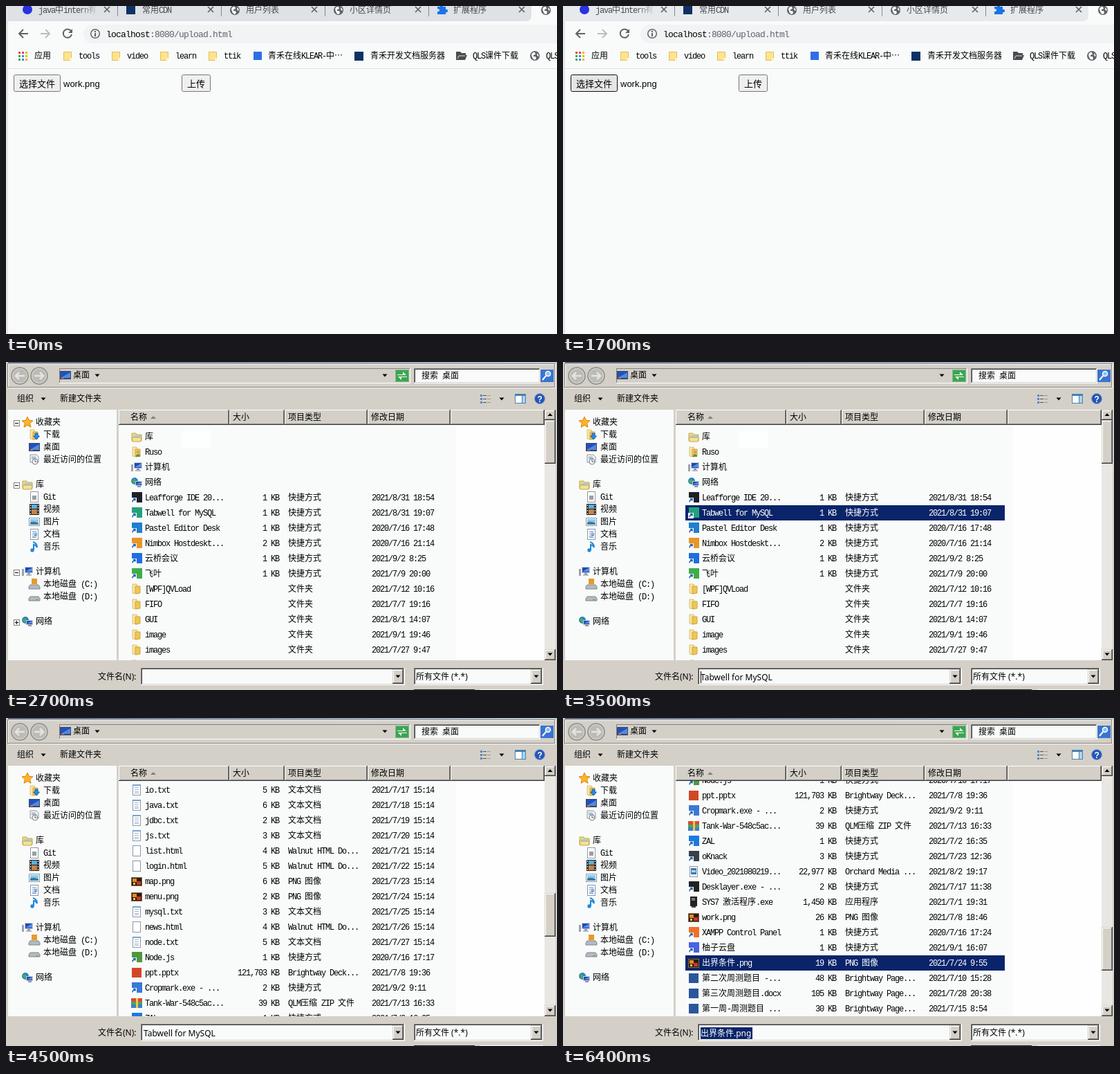
Recreate the animation shown at these times as an HTML page. Size 797 by 474 pixels, loop 8000 ms.

```html
<!DOCTYPE html>
<html lang="zh">
<head>
<meta charset="utf-8">
<title>Upload</title>
<style>
html,body{margin:0;width:100%;height:100%;overflow:hidden;background:#f9fbfa}
svg{display:block;width:797px;height:474px}
text{font:12px "Noto Sans CJK SC","Noto Sans CJK",sans-serif;white-space:pre;fill:#000}
.l{font:12px "Liberation Mono",monospace;letter-spacing:-1.2px}
.url{font:13px "Liberation Mono",monospace;letter-spacing:-.8px}
.ui{font-family:"Noto Sans","Noto Sans CJK SC",sans-serif}
.btn{font:13px "Liberation Sans","Noto Sans CJK SC",sans-serif}
.tab{fill:#45494d}
.link{fill:#00009c;text-decoration:underline}
.on text,.white{fill:#fff}
rect{shape-rendering:crispEdges}
rect[rx]{shape-rendering:auto}
</style>
</head>
<body>
<svg id="stage" viewBox="0 0 797 474"></svg>
<script>
const FACE = '#d4d0c8', PAPER = '#f9fbfa', NAVY = '#0a246a', GREY = '#5f6368';

// drawing helpers
const r = (x, y, w, h, fill, more = '') => `<rect x="${x}" y="${y}" width="${w}" height="${h}" fill="${fill}" ${more}/>`;
const p = (d, fill, line = 'none', width = 1) => `<path d="${d}" fill="${fill}" stroke="${line}" stroke-width="${width}"/>`;
const c = (x, y, rad, fill, line = 'none', width = 1) => `<circle cx="${x}" cy="${y}" r="${rad}" fill="${fill}" stroke="${line}" stroke-width="${width}"/>`;
const g = (body, attrs = '') => `<g ${attrs}>${body}</g>`;
const at = (x, y, body) => g(body, `transform="translate(${x} ${y})"`);
const plain = (x, y, s, cls = '', more = '') => `<text x="${x}" y="${y}" class="${cls}" ${more}>${s}</text>`;
const text = (x, y, s, cls, more) => plain(x, y, s.replace(/[\x20-\x7e]+/g, m => `<tspan class="l">${m}</tspan>`), cls, more);
const down = (x, y) => p(`M${x - 3.5} ${y - 1.5}h7l-3.5 4z`, '#000');
const up = (x, y) => p(`M${x - 3.5} ${y + 2}h7l-3.5 -4z`, '#000');
const raised = (x, y, w, h) => r(x, y, w, h, '#404040') + r(x, y, w - 1, h - 1, '#fff') +
  r(x + 1, y + 1, w - 2, h - 2, '#808080') + r(x + 1, y + 1, w - 3, h - 3, FACE);
const knob = (x, y, w, h) => r(x, y, w, h, '#404040') + r(x, y, w - 1, h - 1, FACE) +
  r(x + 1, y + 1, w - 2, h - 2, '#808080') + r(x + 1, y + 1, w - 3, h - 3, '#fff') + r(x + 2, y + 2, w - 4, h - 4, FACE);
const sunk = (x, y, w, h, fill) => r(x, y, w, h, '#fff') + r(x, y, w - 1, h - 1, '#808080') +
  r(x + 1, y + 1, w - 2, h - 2, FACE) + r(x + 1, y + 1, w - 3, h - 3, '#404040') + r(x + 2, y + 2, w - 4, h - 4, fill);
const etched = (x, y, w, h) => r(x + 1.5, y + 1.5, w, h, 'none', 'stroke="#fff"') + r(x + .5, y + .5, w, h, 'none', 'stroke="#808080"');

// 16 x 16 icons
const sheet = r(2, 0, 12, 16, '#8b98a8') + r(3, 1, 10, 14, '#fff');
const lines = fill => [4, 7, 10, 12].map(y => r(5, y, 6, 1, fill)).join('');
const arrow = r(0, 8, 8, 8, '#fff') + p('M2 14.500q0-3.500 3.500-3.500M3 9.500h3v3', 'none', '#1457a8', 1.4);
const folder = p('M2 1h6l1 2v12l-7-1z', '#f8e6a8', '#dcc070') + p('M6 4h7v10l-7 1z', '#eec653', '#d2a53a');
const screen = (x, y, w, h) => r(x, y, w, h, '#c9ccd4') + r(x + 1, y + 1, w - 2, h - 2, '#1e48b4') +
  p(`M${x + 1} ${y + h - 2}l${w - 2}-${h - 3}v${h - 3}z`, '#5a8ee6');
const icons = {
  folder,
  lib: p('M1 3h6l1 2h7v9H1z', '#f3d878', '#caa544') + r(3, 6, 11, 5, '#9bd0ee') + p('M1 9h14l-1 6H2z', '#f5e19a', '#caa544'),
  user: folder + c(10, 8, 2, '#d59b62') + p('M7 15v-2q3-4 6 0v2z', '#4d9c5a'),
  pc: r(0, 4, 3, 10, '#9aa3ad') + screen(4, 1, 12, 9) + r(8, 10, 4, 2, '#8a939c') + r(6, 12, 8, 2, '#b4bbc4'),
  net: c(5, 6, 5, '#2b7fd0') + p('M1 5q4-4 5 0t-3 5z', '#49ad4c') + screen(6, 6, 10, 7) + r(9, 13, 5, 2, '#8a939c'),
  star: p('M8 0l2.3 5.2 5.7.6-4.3 3.8 1.3 5.7L8 12.4l-5 2.9 1.3-5.7L0 5.8l5.7-.6z', '#fbb428', '#e08212'),
  load: folder + p('M9 6h4v4h2.5L11 15 6.500 10H9z', '#2a8ae2', '#1464b4'),
  desk: r(0, 2, 16, 12, '#3c4660') + r(1, 3, 14, 9, '#2450b8') + p('M1 12L15 4v8z', '#4f8ae0') + r(2, 12, 4, 1, '#e2703a'),
  recent: p('M2 1h9l3 3v8H2z', '#eef2f6', '#8b98a8') + r(4, 4, 6, 1, '#7d8ea2') + r(4, 6, 7, 1, '#7d8ea2') +
    c(9, 11, 4, '#f4f6f8', '#7a858f') + p('M9 8.500V11h2.500', 'none', '#555'),
  git: sheet + r(5, 6, 6, 6, '#9a9ea4'),
  film: r(1, 0, 14, 16, '#222') + r(4, 1, 8, 6, '#5caee0') + r(4, 8, 8, 7, '#c78345') +
    [1, 5, 9, 13].map(y => r(2, y, 1, 2, '#fff') + r(13, y, 1, 2, '#fff')).join(''),
  pic: r(0, 2, 16, 12, '#8b98a8') + r(1, 3, 14, 10, '#fff') + r(2, 4, 12, 8, '#8cc8f0') + p('M2 12V9q5-3 12 1v2z', '#3b7d9e'),
  text: sheet + lines('#5c87c2') + r(8, 6, 4, 4, '#77b0e0'),
  note: p('M6 1q6 2 6 8-1-3-5-4v8', 'none', '#2188dc', 2) + c(5, 13, 2.7, '#2188dc'),
  disk: p('M2 8h12l2 3v3H0v-3z', '#b5bac0', '#7e858c') + r(10, 12, 4, 1, '#56b05c'),
  sys: p('M2 9h12l2 3v3H0v-3z', '#b5bac0', '#7e858c') + r(4, 0, 8, 8, '#e89a2c'),
  pdf: sheet + r(2.5, .5, 11, 15, 'none', 'stroke="#d8202c"') + r(0, 7, 13, 7, '#e02030') +
    plain(1, 13, 'PDF', 'white', 'style="font:bold 6px Liberation Sans,sans-serif"'),
  txt: sheet + lines('#9ab2cc') + r(3, 0, 10, 2, '#7aa4cf'),
  doc: r(1, 1, 14, 14, '#2b579a'),
  ppt: r(1, 1, 14, 14, '#d24726'),
  html: sheet,
  zip: r(0, 1, 16, 5, '#d94b3b') + r(0, 6, 16, 4, '#4aa84e') + r(0, 10, 16, 5, '#3c7fd0') + r(7, 1, 3, 14, '#f2c84c'),
  wmv: sheet + r(4, 3, 8, 9, '#3d78b4') + r(5, 6, 6, 3, '#b4d4ea'),
  exe: r(3, 0, 10, 14, '#222') + r(5, 2, 5, 4, '#777') + r(5, 14, 6, 2, '#444'),
  png: r(0, 2, 16, 13, '#8b6a4a') + r(1, 3, 14, 11, '#2c1a14') + r(2, 4, 6, 5, '#e48a24') + r(8, 8, 6, 5, '#c83c20') + r(3, 10, 3, 3, '#f4d048')
};
const icon = (key, x, y) => at(x, y, key[0] === '#' ? r(1, 0, 15, 15, key) + arrow : icons[key]);

// browser page
const globe = (x, y) => at(x, y, c(0, 0, 7, GREY) + p('M-5 -2q2-4 5-3l1 3-3 1 0 2h3l1 3-2 2q-4-1-5-8zM3 -4q3 2 2.500 5l-2-1z', '#fff'));
const close = x => p(`M${x - 4} 1l8 8m0-8l-8 8`, 'none', GREY, 1.7);
const bookFolder = x => r(x, 66, 12, 13, '#e3c057') + r(x + 1, 67, 10, 11, '#fee390') + r(x + 9, 75, 3, 4, '#fff3c4');
const titles = ['java中intern有', '常用CDN', '用户列表', '小区详情页', '扩展程序'];
const page = r(0, 0, 797, 474, PAPER) + r(0, 0, 3, 474, '#e6e7ec') +
  r(2, 0, 795, 22, '#dee1e6', 'id="strip"') + p('M752 22q8 0 8-8V0h37v22z', PAPER) +
  titles.map((s, i) => text(47 + 150 * i, 10, s, i ? 'tab' : '', i ? '' : 'style="fill:url(#fade)"') +
    close(146 + 150 * i) + (i < 4 ? r(161 + 150 * i, 0, 1, 15, '#858a90') : '')).join('') +
  c(31, 5, 7, '#2932e1') + r(174, -1, 13, 13, '#0d3263') + globe(331, 6) + globe(481, 6) +
  p('M624 1h4q-1-4 2-4t2 4h4v4q3-1 3 2t-3 2v3h-12V8q3 0 3-2t-3-2z', '#1a73e8') + globe(781, 6) +
  p('M32 40H19m6-6l-6 6 6 6', 'none', GREY, 2) + p('M50 40h13m-6-6l6 6-6 6', 'none', '#babcbe', 2) +
  p('M94 36a6.200 6.200 0 1 0 1 5', 'none', GREY, 2) + p('M96 33v6h-6z', GREY) +
  r(112, 27, 720, 27, '#f1f3f4', 'rx="13.5"') + c(129, 40, 6.300, 'none', GREY, 1.500) + r(128, 39, 2, 5, GREY) + r(128, 36, 2, 2, GREY) +
  plain(145, 45, `localhost<tspan fill="${GREY}">:8080/upload.html</tspan>`, 'url') +
  ['#e8453c', '#e8453c', '#f4b400', '#34a853', '#4285f4', '#f4b400', '#34a853', '#4285f4', '#f4b400']
    .map((f, i) => r(18 + i % 3 * 5, 66 + (i / 3 | 0) * 5, 3, 3, f)).join('') +
  text(41, 76, '应用') + ['tools', 'video', 'learn', 'ttik'].map((s, i) => bookFolder(83 + 70 * i) + text(105 + 70 * i, 76, s)).join('') +
  r(358, 66, 12, 12, '#2f6fe4') + text(379, 76, '青禾在线KLEAR-中…') + r(504, 66, 13, 13, '#0d3263') + text(527, 76, '青禾开发文档服务器') +
  p('M651 66h6l2 2h6v3h2l-3 7h-13z', '#4a4d50') + p('M653 76l2-4h9', 'none', '#ddd') + text(675, 76, 'QLS课件下载') +
  globe(765, 72) + text(781, 76, 'QLS课件') + r(3, 90, 794, 1, '#dfe1e5') +
  r(11.5, 99.5, 67, 24, '#efefef', 'id="pick" rx="2" stroke="#767676"') + plain(19, 117, '选择文件', 'btn') + plain(83, 117, 'work.png', 'btn') +
  r(254.5, 99.5, 41, 24, '#efefef', 'rx="2" stroke="#767676"') + plain(262, 117, '上传', 'btn');

// file dialog
const help = (x, y) => c(x, y, 7.500, '#2456b8', '#8fa3c8') + plain(x - 3.5, y + 4.5, '?', 'white', 'style="font:bold 12px Liberation Sans,sans-serif"');
const pane = (x, y) => r(x, y, 16, 14, '#4a80b0') + r(x + 1, y + 3, 9, 10, '#fff') + r(x + 11, y + 3, 4, 10, '#a8d4f0');
const combo = (x, w) => sunk(x, 442, w, 25, PAPER) + knob(x + w - 18, 444, 16, 21) + down(x + w - 10, 454);
const ring = x => c(x, 20, 12, '#bdbbb6', '#8d8d8b', 1.500) + c(x, 20, 10.500, 'none', '#dddbd6');
const base = r(0, 0, 797, 474, FACE) + r(3, 0, 794, 1, 'url(#title)') + etched(2, 2, 791, 34) +
  r(77, 9, 508, 22, '#fff') + r(77, 9, 507, 21, '#808080') + r(78, 10, 506, 20, FACE) +
  r(3, 69, 157, 362, PAPER) + r(163, 69, 616, 362, PAPER) + r(651, 91, 128, 340, '#fdfefd') + r(779, 84, 16, 331, '#e9e7e3') +
  r(254, 99, 42, 25, '#fdfefe', 'id="patch"');
const cols = [163, 323, 403, 523, 643, 779];
const head = cols.slice(1).map((x, i) => raised(cols[i], 69, x - cols[i], 22)).join('') + text(180, 84, '名称') +
  p('M209 82h8l-4-4z', '#808080') + text(328, 84, '大小') + text(408, 84, '项目类型') + text(528, 84, '修改日期');
const typeBox = combo(590, 187) + plain(593, 459, '所有文件 (*.*)', 'ui');
const half = r(651, 69, 128, 362, FACE) + r(779, 69, 16, 15, FACE) + r(5, 33, 72, 3, '#fff') +
  [17, 53].map(y => pane(592, y - 7) + help(628, y)).join('') +
  r(133, 446, 27, 17, '#fff') + r(163, 446, 27, 17, '#fff') + r(195, 442, 383, 26, '#fff') + r(590, 473, 187, 1, '#eceae6');
const full = ring(20) + p('M27 20H14m5-5l-5 5 5 5', 'none', '#e6e4e0', 2.500) + ring(48) + p('M41 20h13m-5-5l5 5-5 5', 'none', '#e6e4e0', 2.500) +
  icon('desk', 78, 11) + text(97, 23, '桌面') + down(132, 19) + down(548, 19) +
  r(563.5, 11.5, 19, 17, '#3aa650', 'stroke="#8cb894"') + p('M566 18h8v-4l5 5h-13zM580 22h-8v4l-5-5h13z', '#f0fbf0') +
  sunk(590, 9, 183, 22, PAPER) + text(601, 24, '搜索 桌面') + r(773, 11, 19, 18, '#3a74d0') + c(784, 17, 3.500, '#8fbcf0', '#fff', 1.500) + p('M781 20l-5 6', 'none', '#fff', 2) +
  text(16, 57, '组织') + down(54, 53) + text(78, 57, '新建文件夹') +
  [47, 52, 57].map(y => r(686, y, 3, 3, '#5a87c0') + r(690, y + 1, 5, 1, '#555') + r(696, y + 1, 5, 1, '#999')).join('') +
  down(717, 53) + pane(736, 46) + help(772, 53) +
  knob(779, 69, 16, 15) + up(787, 76) + knob(779, 415, 16, 16) + down(787, 422) +
  plain(133, 459, '文件名(N):', 'ui') + combo(195, 382) + r(590, 473, 88, 1, '#222') + r(686, 473, 91, 1, '#fff') +
  r(199, 447, 75, 17, NAVY, 'id="nameSel"') + plain(199, 460, '', 'ui', 'id="fileName"') + r(199, 447, 1, 17, '#000', 'id="caret"');

// sidebar: depth, centre, icon, label
const node = ([deep, y, key, label, cls]) => icon(key, deep ? 33 : 23, y - 8) + text(deep ? 54 : 43, y + 4, label, cls);
const box = (y, open) => r(11, y - 3, 9, 9, '#808080') + r(12, y - 2, 7, 7, '#fff') + r(13, y + 1, 5, 1, '#000') + (open ? '' : r(15, y - 1, 1, 5, '#000'));
const roots = (lib, pc, net) => [[0, lib, 'lib', '库'], [0, pc, 'pc', '计算机'], [0, net, 'net', '网络']].map(node).join('');
const favs = [[0, 87, 'star', '收藏夹'], [1, 105, 'load', '下载'], [1, 123, 'desk', '桌面']].map(node).join('');
const shut = node([1, 141, 'recent', '最近访问的位置', 'link']) + roots(177, 213, 249) + box(87, 1) + box(177) + box(213) + box(249);
const open = node([1, 141, 'recent', '最近访问的位置']) + roots(177, 303, 375) +
  [['git', 'Git'], ['film', '视频'], ['pic', '图片'], ['text', '文档'], ['note', '音乐']].map(([k, s], i) => node([1, 195 + 18 * i, k, s])).join('') +
  node([1, 321, 'sys', '本地磁盘 (C:)']) + node([1, 339, 'disk', '本地磁盘 (D:)']) +
  g(box(87, 1) + box(177, 1) + box(303, 1) + box(375), 'id="boxes"');

// list rows: icon|name|date|size
const kinds = {
  folder: '文件夹', txt: '文本文档', pdf: 'PDF File', doc: 'Brightway Page...', ppt: 'Brightway Deck...', html: 'Walnut HTML Do...',
  zip: 'QLM压缩 ZIP 文件', png: 'PNG 图像', exe: '应用程序', wmv: 'Orchard Media ...'
};
const filler = 'css.txt demo.html demo2.html draft.doc form.html git.txt home.html index.html io.txt java.txt jdbc.txt js.txt list.html login.html map.png menu.png mysql.txt news.html node.txt'
  .split(' ').map((s, i) => `${s.split('.')[1]}|${s}|2021/7/${i + 9} 15:14|${i % 5 + 2}`);
const rows = `lib|库
user|Ruso
pc|计算机
net|网络
#202028|Leafforge IDE 20...|2021/8/31 18:54|1
#22a27c|Tabwell for MySQL|2021/8/31 19:07|1
#1f7fd0|Pastel Editor Desk|2020/7/16 17:48|1
#e8962a|Nimbox Hostdeskt...|2020/7/16 21:14|2
#1d6fe0|云桥会议|2021/9/2 8:25|1
#3fae49|飞叶|2021/7/9 20:00|1
folder|[WPF]QVLoad|2021/7/12 10:16
folder|FIFO|2021/7/7 19:16
folder|GUI|2021/8/1 14:07
folder|image|2021/9/1 19:46
folder|images|2021/7/27 9:47
folder|Java|2021/7/5 10:20
folder|Java及设计模式电...|2021/5/13 16:05
folder|Java学习路线配套...|2021/7/3 15:00
folder|song|2021/9/2 8:26
folder|UpUpUp|2021/7/19 8:31
folder|二进制.assets|2021/7/20 19:35
folder|如果耳机没声音看我|2020/7/16 17:29
folder|项目架构选型分析|2021/7/24 16:46
folder|综测成绩|2021/9/4 14:46
pdf|1_Java课程体系v1...|2021/6/30 9:21|8,677
txt|02oop.txt|2021/7/9 15:14|4
txt|03html_css_js.txt|2021/7/9 15:14|2
pdf|500.pdf|2021/6/21 14:36|94,410
txt|API部分单词.txt|2021/7/9 15:14|2
doc|API测题目 - 副本...|2021/7/24 12:49|21
#1a8fd8|Gridshelf|2021/9/1 10:11|1
html|note_walnut_plug...|2021/9/3 10:21|2,369
${filler.join('\n')}
#4c9a3c|Node.js|2020/7/16 17:17|1
ppt|ppt.pptx|2021/7/8 19:36|121,703
#3a78d8|Cropmark.exe - ...|2021/9/2 9:11|2
zip|Tank-War-548c5ac...|2021/7/13 16:33|39
#1c7ae0|ZAL|2021/7/2 16:35|1
#3a3f48|oKnack|2021/7/23 12:36|3
wmv|Video_2021080219...|2021/8/2 19:17|22,977
#222222|Desklayer.exe - ...|2021/7/17 11:38|2
exe|SYS7 激活程序.exe|2021/7/1 19:31|1,450
png|work.png|2021/7/8 18:46|26
#f0702a|XAMPP Control Panel|2020/7/16 17:24|1
#4a62e0|柚子云盘|2021/9/1 16:07|1
png|出界条件.png|2021/7/24 9:55|19
doc|第二次周测题目 -...|2021/7/10 15:28|48
doc|第三次周测题目.docx|2021/7/28 20:38|105
doc|第一周-周测题目 ...|2021/7/15 8:54|30`.split('\n').map(s => s.split('|'));
const row = ([key, name, date, size], i) => {
  const y = 112 + 22 * i;
  const kind = kinds[key] || (key[0] === '#' ? '快捷方式' : '');
  return g(icon(key, 181, y - 12) + text(201, y, name) + text(408, y, kind) + text(529, y, date || '') +
    (size ? text(395, y, size + ' KB', '', 'text-anchor="end"') : ''), 'class="row"');
};

stage.innerHTML = `<defs><linearGradient id="fade" gradientUnits="userSpaceOnUse" x1="105" x2="132" y1="0" y2="0">
<stop stop-color="#45494d"/><stop offset="1" stop-color="#45494d" stop-opacity=".1"/></linearGradient>
<linearGradient id="title"><stop stop-color="${NAVY}"/><stop offset="1" stop-color="#a6caf0"/></linearGradient>
<clipPath id="view"><rect x="163" y="91" width="616" height="340"/></clipPath></defs>` +
  g(page, 'id="page"') +
  g(base + g(g(r(177, 207, 462, 22, NAVY, 'id="bar"') + rows.map(row).join(''), 'id="rows"'), 'id="list" clip-path="url(#view)"') +
    head + g(knob(779, 84, 16, 63), 'id="thumb"') + favs + g(shut, 'id="shut"') + g(open, 'id="open"') +
    typeBox + g(half, 'id="half"') + g(full, 'id="full"'), 'id="dialog"');

// time in ms, changes from then on
const steps = [
  [0, {view: 'page', hover: 0, focus: 0, dim: 0, tree: 0, boxes: 1, caret: 0, sel: -1, name: '', all: 0, y: 0}],
  [100, {hover: 1}],
  [800, {hover: 0, focus: 1, dim: 1}],
  [1600, {hover: 1, dim: 0}],
  [1700, {dim: 1}],
  [2500, {view: 'half'}],
  [2600, {view: 'full'}],
  [2700, {tree: 1}],
  [2900, {boxes: 0}],
  [3000, {caret: 1}],
  [3500, {sel: 5, name: rows[5][1]}],
  [3800, {y: 128, caret: 0}],
  [3900, {y: 256}],
  [4200, {y: 370}],
  [4300, {y: 626}],
  [4500, {y: 884}],
  [4600, {y: 1140}],
  [4800, {sel: 63, name: rows[63][1]}],
  [6400, {all: 1}]
];
const $ = id => document.getElementById(id);
const show = (id, on) => $(id).style.display = on ? '' : 'none';
const move = (id, y) => $(id).setAttribute('transform', `translate(0 ${Math.round(y)})`);
const lineEls = document.querySelectorAll('.row');
let last = -1;

function draw(t) {
  const n = steps.filter(s => s[0] <= t).length;
  if (n === last) return;
  last = n;
  const s = Object.assign({}, ...steps.slice(0, n).map(a => a[1]));
  show('page', s.view === 'page');
  show('dialog', s.view !== 'page');
  show('half', s.view === 'half');
  show('full', s.view === 'full');
  show('list', s.view === 'full');
  show('patch', s.y === 0);
  show('shut', !s.tree);
  show('open', s.tree);
  show('boxes', s.boxes);
  show('caret', s.caret);
  show('nameSel', s.all);
  show('bar', s.sel >= 0);
  $('strip').setAttribute('fill', s.dim ? '#e7eaed' : '#dee1e6');
  $('pick').setAttribute('fill', s.hover ? '#e5e5e5' : '#efefef');
  $('pick').setAttribute('stroke', s.focus ? '#101010' : s.hover ? '#4f4f4f' : '#767676');
  $('fileName').textContent = s.name;
  $('fileName').classList.toggle('white', !!s.all);
  $('bar').setAttribute('y', 97 + 22 * s.sel);
  lineEls.forEach((el, i) => el.classList.toggle('on', i === s.sel));
  move('rows', -s.y);
  move('thumb', s.y * .1914);
}

const start = performance.now();
function tick() {
  draw((performance.now() - start) % 8000);
  requestAnimationFrame(tick);
}
tick();
</script>
</body>
</html>
```
